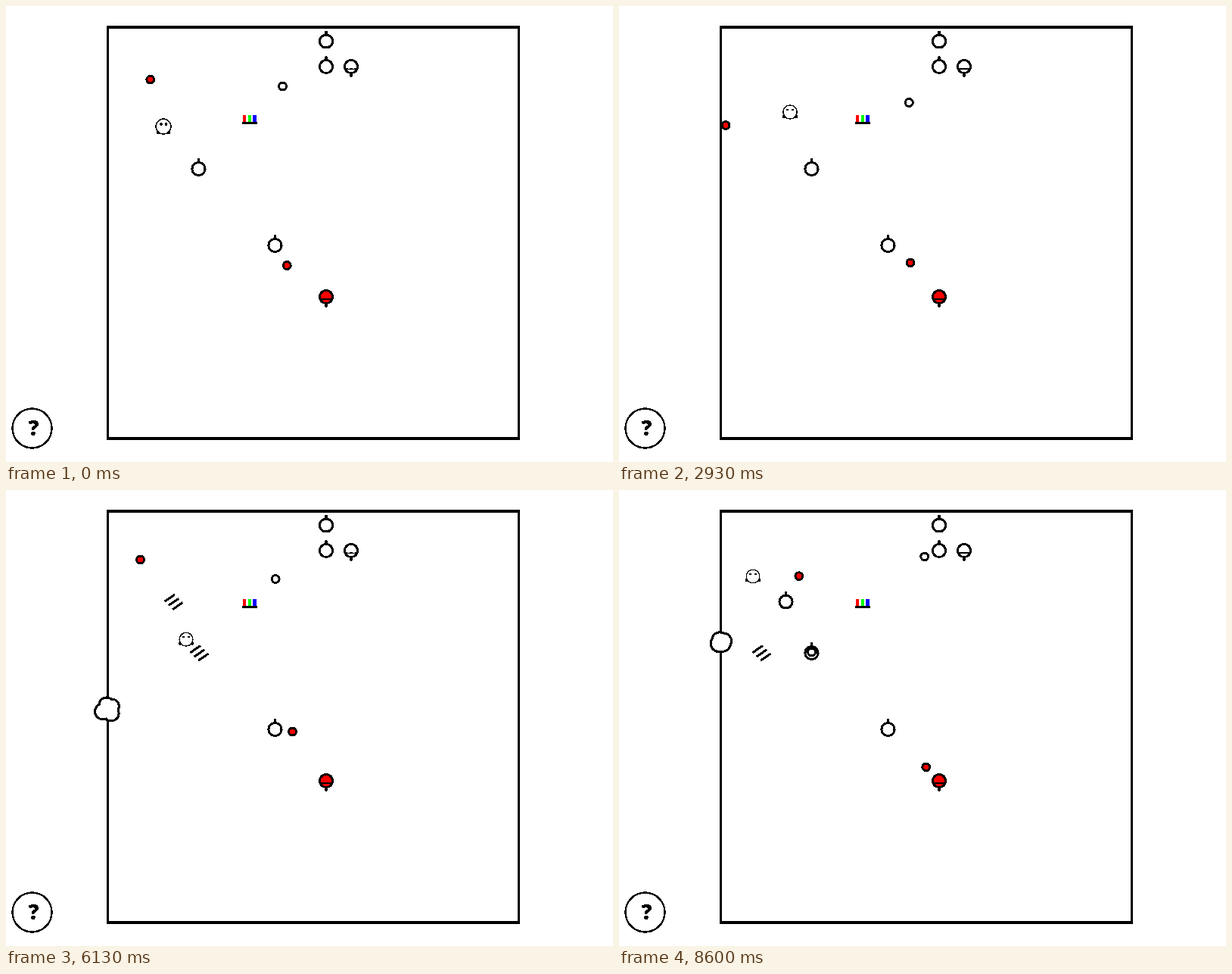
An HTML page with a canvas that plays this animation: 802 px wide and 602 px high, repeating every 8630 ms.

```html
<!DOCTYPE html>
<html lang="en">
<head>
<meta charset="utf-8">
<title>Arena</title>
<style>
  html, body { margin: 0; width: 100%; height: 100%; overflow: hidden; background: #fff; }
  canvas { display: block; filter: url(#crisp); }
  svg { position: absolute; }
</style>
</head>
<body>
<svg width="0" height="0">
  <filter id="crisp" x="0" y="0" width="1" height="1" color-interpolation-filters="sRGB">
    <feComponentTransfer>
      <feFuncR type="discrete" tableValues="0 1"/>
      <feFuncG type="discrete" tableValues="0 1"/>
      <feFuncB type="discrete" tableValues="0 1"/>
    </feComponentTransfer>
  </filter>
</svg>
<canvas id="stage" width="802" height="602"></canvas>
<script>
const ctx = document.getElementById('stage').getContext('2d');
const LOOP = 8630, SPEED = 0.1008, RELOAD = 3003, PUFF_LIFE = 520, STEP = 274;
const LEFT = 135, TOP = 28;
const RED = '#f00', WHITE = '#fff', BLACK = '#000';

// Shots leave every RELOAD ms, at these angles in degrees
const guns = [
  { x: 423, y: 384, color: RED, first: -3660, aims: [231, 218.8, 229.95, 235.6, 226.5] },
  { x: 456, y: 80, color: WHITE, first: -933, aims: [164, 146.9, 159.4, 171.4] }
];

const pegs = [{ x: 423, y: 46.5 }, { x: 423, y: 80 }, { x: 355.5, y: 316 }];

// Cells that are hatched while being built, and hold a peg afterwards
const sites = [
  { x: 220.5, y: 147.5, begin: 3700, done: 6770 },
  { x: 254.5, y: 215, begin: 5450, done: 7700, hadPeg: true },
  { x: 187.5, y: 215, begin: 6455, done: Infinity }
];

// Stops on the walk: time, x, y
const stops = [
  [0, 208, 159], [450, 212, 118], [1230, 262, 99], [2063, 285, 191],
  [2930, 226, 140], [3900, 223, 127], [5070, 290, 142], [5400, 276, 183],
  [6900, 198, 212], [8069, 201, 119], [8600, 177, 114]
];

function random(seed, n) {
  const v = Math.sin(seed * 12.9898 + n * 78.233) * 43758.5453;
  return v - Math.floor(v);
}

const bullets = [], puffs = [];

function addPuff(x, y, born, color, scale) {
  const seed = puffs.length + 1;
  const parts = [0, 1, 2, 3].map(i => {
    const angle = (i + random(seed, 9) + random(seed, i) * 0.4) * Math.PI / 2;
    const reach = (9 + 3 * random(seed, i + 4)) * scale;
    return { dx: Math.cos(angle) * reach, dy: Math.sin(angle) * reach,
      r: (9.5 + 1.5 * random(seed, i + 10)) * scale };
  });
  puffs.push({ x, y, born, color, parts });
}

guns.forEach(({ x, y, color, first, aims }) => aims.forEach((deg, i) => {
  const ux = Math.cos(deg * Math.PI / 180), uy = Math.sin(deg * Math.PI / 180);
  const reach = Math.min((LEFT - x) / ux, uy < 0 ? (TOP - y) / uy : Infinity);
  const born = first + i * RELOAD, end = born + reach / SPEED;
  bullets.push({ x, y, ux, uy, born, end, color });
  addPuff(x + ux * reach, y + uy * reach, end, color, 1);
}));
bullets.push({ x: 254.5, y: 215, ux: 0, uy: -1, born: 8590, end: LOOP, color: WHITE });

sites.forEach(({ x, y, begin, done }) => {
  addPuff(x, y, begin, WHITE, 1.4);
  addPuff(x, y, done, WHITE, 1.4);
});

function ellipse(x, y, rx, ry, fill, width) {
  ctx.beginPath();
  ctx.ellipse(x, y, rx, ry, 0, 0, Math.PI * 2);
  ctx.fillStyle = fill;
  ctx.fill();
  if (width) { ctx.lineWidth = width; ctx.stroke(); }
}
const disc = (x, y, r, fill, width) => ellipse(x, y, r, r, fill, width);

function box(x, y, w, h, color) {
  ctx.fillStyle = color;
  ctx.fillRect(x, y, w, h);
}

function drawScene() {
  box(0, 0, 802, 602, WHITE);
  ctx.strokeStyle = BLACK;
  ctx.lineWidth = 3.4;
  ctx.strokeRect(134.5, 28, 543, 543);
  disc(34.5, 557.5, 26, WHITE, 2.4);
  ctx.fillStyle = BLACK;
  ctx.font = '800 28px "Open Sans", sans-serif';
  ctx.textAlign = 'center';
  ctx.fillText('?', 36.5, 567);
  [RED, '#0f0', '#00f'].forEach((color, i) => box(313 + i * 6.75, 144, 4, 9, color));
  box(312, 153, 20, 3, BLACK);
}

function drawPeg({ x, y }) {
  box(x - 1.7, y - 13.5, 3.5, 6, BLACK);
  disc(x, y, 8.6, WHITE, 3);
}

function drawHatch({ x, y }) {
  ctx.lineWidth = 3;
  for (let i = -1; i <= 1; i++) {
    const cx = x + 1 + i * 5.25, cy = y + 0.4 + i * 5.2;
    ctx.beginPath();
    ctx.moveTo(cx - 6.7, cy + 4.6);
    ctx.lineTo(cx + 6.7, cy - 4.6);
    ctx.stroke();
  }
}

function drawSite(site, t) {
  if (t >= site.begin && t < site.done) drawHatch(site);
  else if (t >= site.done || site.hadPeg) drawPeg(site);
}

// The mouth ripples more as the next shot comes closer
function drawGun({ x, y, color, first }, t) {
  const charge = (t - first) % RELOAD / RELOAD;
  box(x - 1.7, y + 7, 3.5, 6.5, BLACK);
  disc(x, y, 8.6, color, 3);
  ctx.beginPath();
  for (let i = -7; i <= 7; i++) {
    ctx.lineTo(x + i, y + 3 - Math.cos(i * 0.9) * charge * 1.4);
  }
  ctx.lineWidth = 1.5;
  ctx.stroke();
}

function playerAt(t) {
  const next = Math.max(1, stops.findIndex(s => s[0] > t));
  if (t >= stops[stops.length - 1][0]) return stops[stops.length - 1].slice(1);
  const [t0, x0, y0] = stops[next - 1], [t1, x1, y1] = stops[next];
  const k = (t - t0) / (t1 - t0);
  return [x0 + (x1 - x0) * k, y0 + (y1 - y0) * k];
}

function drawPlayer(t) {
  const [x, y] = playerAt(t);
  const bounce = Math.cos(t / STEP * Math.PI * 2);
  const r = 9.3 + 0.6 * bounce;
  const angle = 0.7 + 0.17 * bounce;
  [-1, 1].forEach(side => {
    disc(x + side * Math.cos(angle) * (r + 0.8), y + Math.sin(angle) * (r + 0.8), 2.2, BLACK);
  });
  disc(x, y, r, WHITE, 1.5);
  [-3.2, 3.4].forEach(dx => ellipse(x + dx, y - 3, 1.9, 1.5 + 0.5 * bounce, BLACK));
}

function drawBullet({ x, y, ux, uy, born, color }, t) {
  const d = (t - born) * SPEED;
  disc(x + ux * d, y + uy * d, 4.9, color, 3);
}

// All rims first, then all fills, so the pieces melt together
function drawPuff({ x, y, born, color, parts }, t) {
  const age = t - born;
  const spread = age / 400;
  const size = Math.min(1, (PUFF_LIFE - age) / 150);
  [[1.5, BLACK], [-1.5, color]].forEach(([rim, paint]) => parts.forEach(({ dx, dy, r }) => {
    const radius = r * size + rim;
    if (radius > 0) disc(x + dx * spread, y + dy * spread, radius, paint);
  }));
}

function draw(t) {
  drawScene();
  pegs.forEach(drawPeg);
  sites.forEach(site => drawSite(site, t));
  guns.forEach(gun => drawGun(gun, t));
  drawPlayer(t);
  bullets.filter(b => t >= b.born && t < b.end).forEach(b => drawBullet(b, t));
  puffs.filter(p => t >= p.born && t < p.born + PUFF_LIFE).forEach(p => drawPuff(p, t));
}

const start = performance.now();
function tick() {
  draw((performance.now() - start) % LOOP);
  requestAnimationFrame(tick);
}
tick();
</script>
</body>
</html>
```
